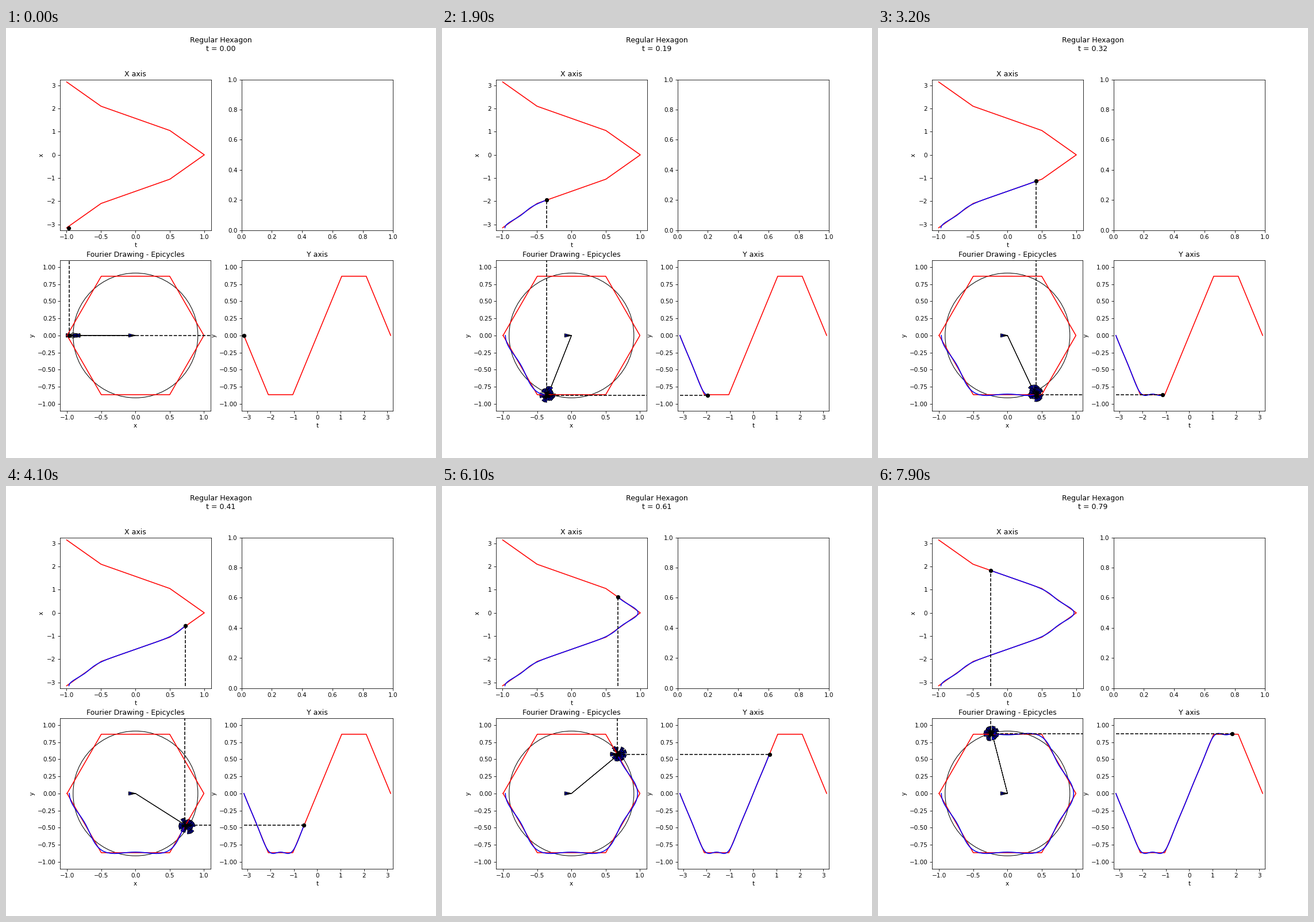
Animation, 748 px wide and 748 px high, one loop 8000 ms. Source, as a matplotlib script:

```python
import numpy as np
import matplotlib.pyplot as plt
from matplotlib.animation import FuncAnimation
from matplotlib.patches import Circle

FRAMES, INTERVAL = 80, 100
STEP = 2 * np.pi / 100
ORDER = 10
EPS = 1e-9                             # vanishing terms still show an arrow head
FLIPPED = {-2, 6, -6, 8, -8, 10, -10}  # vanishing terms with negative sign

# 0, 1, -1, 2, -2, ...
freqs = [0] + [s * n for n in range(1, ORDER + 1) for s in (1, -1)]


def coefficient(n):
    """Fourier coefficient of the unit hexagon."""
    if n % 6 == 1:
        return (3 / np.pi) ** 2 / n ** 2
    return -EPS if n in FLIPPED else EPS


coefs = np.array([coefficient(n) for n in freqs])


def joints(theta):
    """Origin and the tip of every epicycle arm at one angle."""
    arms = coefs * np.exp(1j * np.array(freqs) * theta)
    return np.concatenate([[0], np.cumsum(arms)])


thetas = -np.pi + STEP * np.arange(FRAMES)
path = np.array([joints(a)[-1] for a in thetas])

corner_t = np.linspace(-np.pi, np.pi, 7)
corners = np.exp(1j * corner_t)

fig, ((ax_x, ax_none), (ax_c, ax_y)) = plt.subplots(2, 2, figsize=(10, 10), dpi=74.8)
heading = fig.suptitle("")


def setup(ax, title, xlabel, ylabel, xlim, ylim, xs, ys):
    ax.set_title(title)
    ax.set_xlabel(xlabel)
    ax.set_ylabel(ylabel)
    ax.set_xlim(-xlim, xlim)
    ax.set_ylim(-ylim, ylim)
    ax.plot(xs, ys, "r")


UNIT, TURN = 1.1, np.pi + 0.1
setup(ax_x, "X axis", "t", "x", UNIT, TURN, corners.real, corner_t)
setup(ax_y, "Y axis", "t", "y", TURN, UNIT, corner_t, corners.imag)
setup(ax_c, "Fourier Drawing - Epicycles", "x", "y", UNIT, UNIT,
      corners.real, corners.imag)
ax_c.set_aspect("equal")

circles, arrows = [], []
for c in coefs:
    if abs(c) > EPS:
        circles.append(ax_c.add_patch(Circle((0, 0), abs(c), fill=False)))
    else:
        circles.append(None)
    arrows.append(ax_c.arrow(0, 0, EPS, 0, head_width=0.05, head_length=0.1,
                             length_includes_head=True, fc="b", ec="k"))

panels = (ax_x, ax_y, ax_c)
traces = [ax.plot([], [], "b")[0] for ax in panels]
drop_x, drop_y, drop_up, drop_right = [
    ax.plot([], [], "k--")[0] for ax in (ax_x, ax_y, ax_c, ax_c)]
dots = [ax.plot([], [], "ko")[0] for ax in panels]


def update(i):
    theta, x, y = thetas[i], path[i].real, path[i].imag
    heading.set_text(f"Regular Hexagon\nt = {i / 100:.2f}")

    pts = joints(theta)
    for a, b, circle, arrow in zip(pts, pts[1:], circles, arrows):
        if circle:
            circle.center = (a.real, a.imag)
        arrow.set_data(x=a.real, y=a.imag, dx=(b - a).real, dy=(b - a).imag)

    t, xs, ys = thetas[:i + 1], path.real[:i + 1], path.imag[:i + 1]
    for line, dot, u, v in zip(traces, dots, (xs, t, xs), (t, ys, ys)):
        line.set_data(u, v)
        dot.set_data(u[-1:], v[-1:])

    drop_x.set_data([x, x], [-np.pi, theta])
    drop_y.set_data([-np.pi, theta], [y, y])
    drop_up.set_data([x, x], [y, UNIT])
    drop_right.set_data([x, UNIT], [y, y])
    return []


anim = FuncAnimation(fig, update, frames=FRAMES, interval=INTERVAL,
                     repeat=True, repeat_delay=0, blit=False)
plt.show()
```
